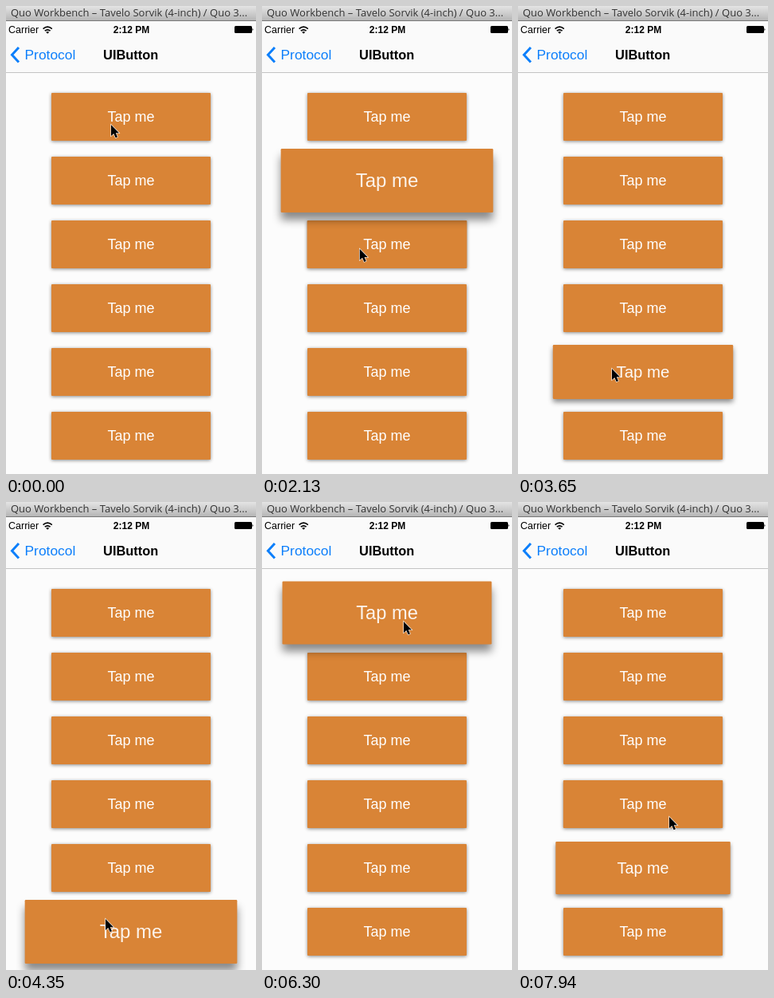
These frames come from a looping animation (314x587 px, 8000 ms). An HTML page:

```html
<!DOCTYPE html>
<html lang="en">
<head>
<meta charset="utf-8">
<style>
  html, body { margin: 0; width: 100%; height: 100%; overflow: hidden; background: #fcfcfc; }
  body { position: relative; }
  svg { position: absolute; left: 0; top: 0; }
  svg, button { font-family: "Liberation Sans", Arial, sans-serif; }
  button {
    position: absolute; left: 57px; width: 200px; height: 60px;
    padding: 0; border: 0; border-radius: 1px;
    background: #d98436; color: #fff;
    font-size: 18px; line-height: 60px; text-align: center;
  }
  #cursor { z-index: 2000; overflow: visible; }
</style>
</head>
<body>
<svg width="314" height="587">
  <defs>
    <linearGradient id="bar" x2="0" y2="1">
      <stop stop-color="#e4e4e4"/>
      <stop offset="1" stop-color="#b6b6b6"/>
    </linearGradient>
  </defs>
  <rect width="314" height="18" fill="url(#bar)"/>
  <rect y="18" width="314" height="1" fill="#777"/>
  <text x="6" y="12.5" font-size="13" fill="#333" style="font-family:'Open Sans',sans-serif">Quo Workbench – Tavelo Sorvik (4-inch) / Quo 3...</text>

  <rect y="19" width="314" height="64" fill="#fafafa"/>
  <rect y="83" width="314" height="1" fill="#c4c4c4"/>
  <text x="3" y="34" font-size="12.5">Carrier</text>
  <g fill="none" stroke="#000" stroke-width="1.7">
    <path d="M46.6 28.6Q52.2 23.8 57.8 28.6"/>
    <path d="M48.8 31.2Q52.2 28.4 55.6 31.2"/>
  </g>
  <path d="M50.2 32.7Q52.2 31.2 54.2 32.7L52.2 34.8Z"/>
  <text x="157.5" y="34" font-size="12" font-weight="bold" text-anchor="middle">2:12 PM</text>
  <rect x="287" y="25" width="22" height="9" rx="1.5"/>
  <path d="M309.5 28q2 1.5 0 3z"/>

  <path d="M16 52L7.5 61.2L16 70.4" fill="none" stroke="#0d7ffb" stroke-width="3"/>
  <text x="23.5" y="67" font-size="17.4" fill="#0d7ffb">Protocol</text>
  <text x="156.7" y="67" font-size="16.4" font-weight="bold" text-anchor="middle">UIButton</text>
</svg>

<svg id="cursor" width="12" height="18">
  <path d="M0 0V14L3.3 11L5.6 16.2L8 15.2L5.8 10.2H10Z" stroke="#fff" stroke-width="1.2" paint-order="stroke"/>
</svg>

<script>
const LOOP = 8000, PRESS = 545;
const ROWS = 6, FIRST = 139, PITCH = 80;      // button centres
const ENTER_REACH = 30, HOLD_REACH = 40;      // half heights, small and lifted
const ENTER_LAG = 25, LEAVE_LAG = 75, RISE = 300, FALL = 200;

// Pointer drags: start, duration, and where the tip ends up.
const home = { x: 132, y: 149 };
const drags = [
  [1330, 140, 130, 225],
  [2000, 200, 120, 335],
  [2575, 255, 115, 414],
  [2880, 70, 115, 424],
  [3470, 100, 118, 455],
  [3800, 160, 122, 533],
  [4290, 60, 125, 523],
  [4940, 480, 167, 540],
  [5700, 368, 178, 150],
  [6748, 450, 192, 450],
  [7215, 60, 190, 416],
  [7790, 25, 190, 432],
  [7850, 90, 190, 395],
];

const mix = (a, b, p) => a + (b - a) * p;
const ease = p => (p = Math.max(0, Math.min(p, 1)), p * p * (3 - 2 * p));
const centre = row => FIRST + PITCH * row;

function pointerAt(t) {
  return drags.reduce((from, [start, span, x, y]) => {
    const p = ease((t - start) / span);
    return { x: mix(from.x, x, p), y: mix(from.y, y, p) };
  }, home);
}

// Per button: alternating times of rising and falling, found by following the drag.
function findTouches() {
  const touches = Array.from({ length: ROWS }, () => []);
  let held = null;
  for (let t = PRESS; t < LOOP; t += 2) {
    const { y } = pointerAt(t);
    const row = Math.round((y - FIRST) / PITCH);
    if (held !== null && Math.abs(y - centre(held)) > HOLD_REACH) {
      touches[held].push(t + LEAVE_LAG);
      held = null;
    }
    if (held === null && Math.abs(y - centre(row)) < ENTER_REACH) {
      touches[row].push(t + ENTER_LAG);
      held = row;
    }
  }
  return touches;
}

// Each change eases on from wherever the lift was at that moment.
function liftAt(times, t) {
  return times.reduce((lift, start, i) => {
    const end = Math.min(t, times[i + 1] ?? LOOP);
    const falling = i % 2;
    return mix(lift, falling ? 0 : 1, ease((end - start) / (falling ? FALL : RISE)));
  }, 0);
}

const cursor = document.getElementById('cursor');
const touches = findTouches();
const buttons = touches.map((_, row) => {
  const b = document.createElement('button');
  b.textContent = 'Tap me';
  b.style.top = centre(row) - 30 + 'px';
  document.body.append(b);
  return b;
});

function draw(t) {
  buttons.forEach((b, row) => {
    const k = liftAt(touches[row], t), s = b.style;
    s.transform = `scale(${1 + k / 3})`;
    s.boxShadow = `0 ${mix(1, 7, k)}px ${mix(4, 8, k)}px rgba(0,0,0,.46)`;
    s.color = `rgba(255,255,255,${mix(1, .9, k)})`;
    s.zIndex = Math.round(k * 1000);
  });
  const { x, y } = pointerAt(t);
  cursor.style.transform = `translate(${x}px, ${y}px)`;
}

const begin = performance.now();
function tick() {
  draw((performance.now() - begin) % LOOP);
  requestAnimationFrame(tick);
}
tick();
</script>
</body>
</html>
```
